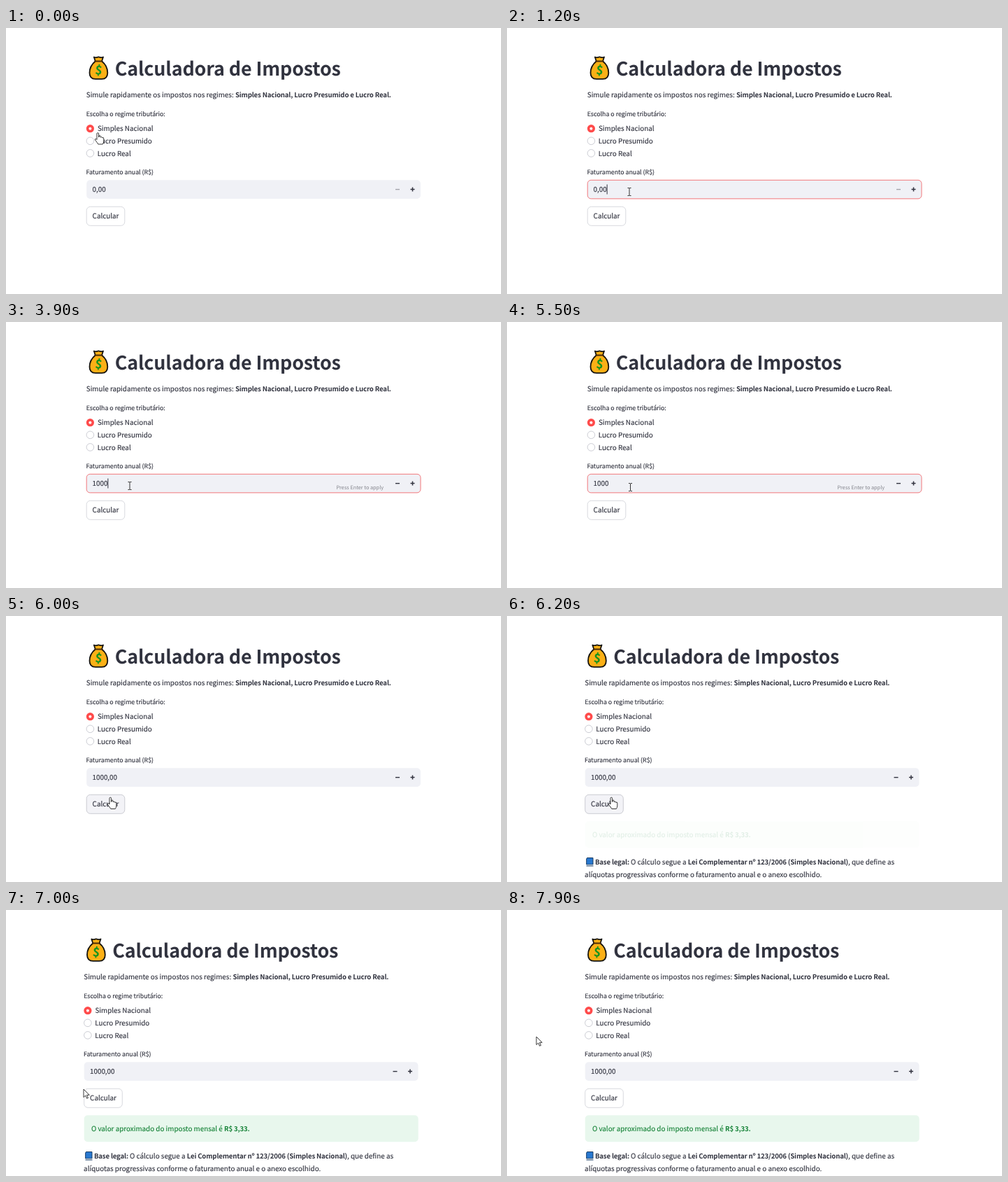
These frames come from a looping animation (708x380 px, 8000 ms). An HTML page:

```html
<!DOCTYPE html>
<html lang="pt-BR">
<head>
<meta charset="utf-8">
<title>Calculadora de Impostos</title>
<style>
  html, body { margin: 0; width: 100%; height: 100%; overflow: hidden; background: #fff; }
  svg { display: block; color: #31333f; }
  text {
    font: 9.85px "Noto Sans CJK JP", "Noto Sans CJK SC", "Noto Sans CJK", "Noto Sans", sans-serif;
    fill: currentColor; stroke: currentColor; stroke-width: .15;
    text-rendering: geometricPrecision; white-space: pre;
  }
  .bold { font-size: 9.65px; font-weight: 700; letter-spacing: -.016em; stroke: none; }
  .title { font-size: 26.9px; font-weight: 700; letter-spacing: -.005em; stroke: none; }
  .label { font-size: 8.8px; }
  .hint { font-size: 7.3px; color: #85868e; stroke: none; }
  .radio { fill: #fff; stroke: #c6c7ce; stroke-width: .9; }
  #alert { color: #158237; }
  .pointer { fill: #fff; stroke: #222; stroke-width: .9; stroke-linejoin: round; }
</style>
</head>
<body>
<svg width="708" height="380" viewBox="0 0 708 380">
  <g id="page">
    <path d="M125.8 41.5Q129 43 132.3 41.3Q136 43 139 41.5L137 47.5C141.5 51 145.3 57 145.3 64Q145.3 72.8 137 72.9H128Q119.5 72.8 119.5 64C119.5 57 123.5 51 127.8 47.5Z"
      fill="#fbb016" stroke="#15130e" stroke-width="1.8" stroke-linejoin="round"/>
    <path d="M127.3 47.5H137.7" stroke="#4a2c0c" stroke-width="1.8" stroke-linecap="round"/>
    <text x="127.6" y="66.3" transform="rotate(6 132 60)" style="font-size:17px;font-weight:700;color:#15941f">$</text>
    <text class="title" x="155.7" y="68">Calculadora de Impostos</text>

    <text x="114.8" y="99.3">Simule rapidamente os impostos nos regimes: <tspan class="bold">Simples Nacional, Lucro Presumido e Lucro Real.</tspan></text>

    <text class="label" x="114.7" y="125.8">Escolha o regime tributário:</text>
    <circle cx="120.4" cy="143.7" r="5.6" fill="#ff4b4b"/>
    <circle cx="120.4" cy="143.7" r="2" fill="#fff"/>
    <circle class="radio" cx="120.4" cy="161.3" r="5.3"/>
    <circle class="radio" cx="120.4" cy="178.9" r="5.3"/>
    <text x="131" y="147.2">Simples Nacional</text>
    <text x="130.8" y="164.9">Lucro Presumido</text>
    <text x="130.8" y="182.5">Lucro Real</text>

    <text class="label" x="114.5" y="208.6">Faturamento anual (R$)</text>
    <rect id="field" x="115.2" y="217.3" width="477.8" height="26.6" rx="5" fill="#f0f1f6"/>
    <rect id="selection" x="123.5" y="222" width="19" height="17" fill="#0078d7"/>
    <text id="value" x="123.5" y="234"></text>
    <rect id="caret" y="223.5" width="1" height="14" fill="#31333f"/>
    <text id="hint" class="hint" x="472.5" y="239">Press Enter to apply</text>
    <path id="minus" d="M557 230.6h6" stroke-width="1.4"/>
    <path d="M578.5 230.6h6m-3-3v6" stroke="#31333f" stroke-width="1.5"/>

    <rect id="button" x="115.2" y="255.3" width="54.6" height="27" rx="5.4" stroke-width=".8"/>
    <text x="142.5" y="272" text-anchor="middle">Calcular</text>

    <g id="alert">
      <rect x="115.2" y="293.3" width="478" height="38" rx="5" fill="#e8f7ed"/>
      <text x="125.4" y="316">O valor aproximado do imposto mensal é <tspan class="bold">R$ 3,33.</tspan></text>
    </g>
    <g id="legal">
      <path d="M118 345.5h8.5v9.5h-9.3v-8z" fill="#2878d0" stroke="#173a63" stroke-linejoin="round"/>
      <path d="M118 356h9" stroke="#dfe6ee"/>
      <path d="M117 357h10" stroke="#173a63"/>
      <text x="129.4" y="355.2"><tspan class="bold">Base legal:</tspan> O cálculo segue a <tspan class="bold">Lei Complementar nº 123/2006 (Simples Nacional)</tspan>, que define as</text>
      <text x="114.6" y="373">alíquotas progressivas conforme o faturamento anual e o anexo escolhido.</text>
    </g>
  </g>

  <g id="mouse">
    <path id="arrow" class="pointer" d="M0 0V11.5L2.7 9L4.6 13.2L6.5 12.4L4.6 8.3H8.2Z"/>
    <path id="hand" class="pointer" d="M-1.5 9V.5Q-1.5-.8-.2-.8T1.1.5V5.5Q3-.2 3.6 5.6Q5.8 4 6.1 6.3Q8.3 5.2 8.3 7.5V11Q8.3 13.5 6.8 15.5H.3Q-1 13-4 9.5Q-4.6 7.6-2.8 7.8Z"/>
    <path id="beam" d="M-2.5-5.5H-.6L0-5L.6-5.5H2.5M0-5V5M-2.5 5.5H-.6L0 5L.6 5.5H2.5" fill="none" stroke="#333"/>
  </g>
</svg>
<script>
const $ = id => document.getElementById(id);
const show = (id, on) => { $(id).style.display = on ? "" : "none"; };
const within = (v, from, to) => v >= from && v < to;

const DURATION = 8000, STEP = 100;
// [time, value]
const typing = [[0, "0,00"], [3000, "1"], [3400, "10"], [3700, "100"], [3900, "1000"], [6000, "1000,00"]];
// [time, x, y]
const route = [
  [0, 131.5, 150.5], [100, 134, 154], [300, 146, 176], [600, 166, 217], [900, 175, 234],
  [2000, 175, 234], [2100, 177, 234], [5400, 177, 234], [5500, 176.5, 236], [5600, 173, 241],
  [5900, 151, 258], [6000, 149.5, 260], [6300, 149.5, 260], [6500, 147, 261], [6600, 146, 261],
  [7000, 111, 256], [7200, 84, 227], [7500, 42, 178], [7700, 42, 178], [7900, 42, 181]
];

function mouseAt(t) {
  const i = route.findIndex(key => key[0] > t);
  if (i < 0) return route.at(-1).slice(1);
  const [t0, x0, y0] = route[i - 1], [t1, x1, y1] = route[i];
  const u = (t - t0) / (t1 - t0);
  return [x0 + (x1 - x0) * u, y0 + (y1 - y0) * u];
}

function draw(t) {
  const shift = t >= 6100 ? -3.5 : 0;
  const focused = within(t, 1200, 6000);
  const selected = within(t, 1600, 3000);
  $("page").setAttribute("transform", `translate(${shift})`);

  const value = $("value");
  value.textContent = typing.findLast(key => key[0] <= t)[1];
  value.style.color = selected ? "#fff" : "";
  $("field").setAttribute("stroke", focused ? "#f2777b" : "none");
  $("minus").setAttribute("stroke", t < 3100 ? "#a3a4ab" : "#31333f");
  $("caret").setAttribute("x", 123.5 + value.getComputedTextLength());
  show("caret", within(t, 1200, 1600) || within(t, 3000, 4500) || within(t, 5000, 5500));
  show("selection", selected);
  show("hint", within(t, 3000, 6000));
  show("legal", t >= 6100);
  $("alert").style.opacity = t < 6200 ? 0 : t < 6300 ? .12 : t < 6400 ? .85 : 1;

  const [x, y] = mouseAt(t);
  const overButton = within(x - shift, 115, 170) && within(y, 255, 283);
  const overField = x > 115 && within(y, 217, 245) && t < 6000;
  const overRadio = within(x, 115, 212) && within(y, 135, 187);
  $("button").setAttribute("fill", overButton ? "#f3f3f7" : "#fff");
  $("button").setAttribute("stroke", overButton ? "#bfc0c8" : "#cfd0d6");
  $("mouse").setAttribute("transform", `translate(${x} ${y})`);
  show("hand", overButton || overRadio);
  show("beam", overField);
  show("arrow", !overButton && !overRadio && !overField);
}

function tick() {
  draw(Math.floor(performance.now() % DURATION / STEP) * STEP);
  requestAnimationFrame(tick);
}
tick();
</script>
</body>
</html>
```
